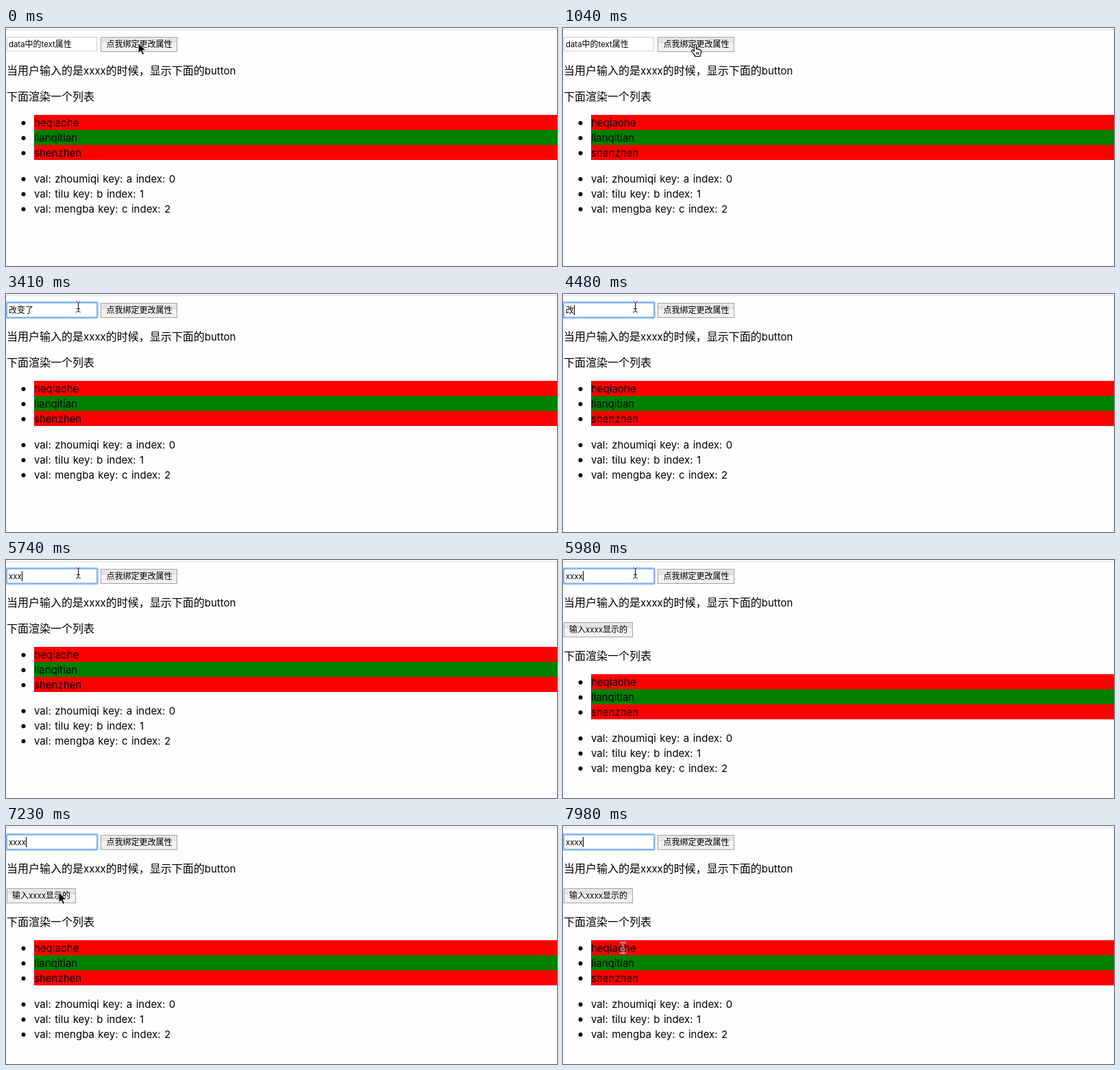
These frames come from a looping animation (804x348 px, 8000 ms). An HTML page:

```html
<!DOCTYPE html>
<html lang="zh-CN">
<head>
<meta charset="utf-8">
<title>Data binding demo</title>
<style>
  html, body { margin: 0; width: 100%; height: 100%; overflow: hidden; background: #fefefe; }
  svg { display: block; width: 804px; height: 348px; }
  text { font: 16px Inter, "Noto Sans CJK SC", "Noto Sans CJK", sans-serif; fill: #000; white-space: pre; }
  .latin { font-size: 15px; word-spacing: 1.25px; }
  .small { font-size: 12px; }
  .small .latin { font-size: 11.4px; word-spacing: 0; }
  .button rect { fill: url(#face); stroke: #a3a3a3; }
  .button.pressed rect { fill: url(#facePressed); stroke: #8a8a8a; }
  .crisp { shape-rendering: crispEdges; }
</style>
</head>
<body>
<svg viewBox="0 0 804 348">
  <defs>
    <linearGradient id="face" x2="0" y2="1">
      <stop offset="0" stop-color="#e9e9e9"/>
      <stop offset=".4" stop-color="#dedede"/>
      <stop offset=".42" stop-color="#f4f4f4"/>
      <stop offset="1" stop-color="#f0f0f0"/>
    </linearGradient>
    <linearGradient id="facePressed" x2="0" y2="1">
      <stop offset="0" stop-color="#bdbdbd"/>
      <stop offset="1" stop-color="#d6d6d6"/>
    </linearGradient>
  </defs>

  <path class="crisp" d="M0 2.5H804" stroke="#d9d9d9"/>

  <rect x="1.5" y="13.5" width="131" height="20" fill="#fff" stroke="#cfcfcf"/>
  <g id="focus" fill="none">
    <rect x="0.5" y="12" width="133" height="23" rx="2" stroke="#b5d6f9" stroke-width="3"/>
    <rect x="1" y="12.5" width="132" height="22" rx="1.5" stroke="#6fafef" stroke-width="1.6"/>
  </g>
  <text id="field" class="small" x="4" y="28"></text>
  <path id="caret" class="crisp" d="M.5 16V31" stroke="#000"/>

  <g id="change" class="button">
    <rect x="138.5" y="13.5" width="111" height="21"/>
    <text class="small" x="146.5" y="28">点我绑定更改属性</text>
  </g>

  <text x="1" y="68">当用户输入的是<tspan class="latin">xxxx</tspan>的时候，显示下面的<tspan class="latin">button</tspan></text>

  <g id="extra" class="button">
    <rect x="1.5" y="91.5" width="100" height="21"/>
    <text class="small" x="9" y="106">输入<tspan class="latin">xxxx</tspan>显示的</text>
  </g>

  <g id="lists">
    <text x="1" y="106">下面渲染一个列表</text>
  </g>

  <g id="cursor" stroke-linejoin="round" stroke-linecap="round">
    <path data-kind="arrow" d="M0 0V15L3.6 11.7L6 17.3L8.6 16.2L6.2 10.8H11Z" fill="#000" stroke="#fff"/>
    <path data-kind="hand" fill="#fff" stroke="#000" stroke-width="1.2"
      d="M-1.5 10V1.5Q-1.5 0 0 0T1.5 1.5V7Q3 5.6 4.2 7.4Q5.8 6.4 6.8 8.2Q8.6 7.6 8.6 9.5V12Q8.4 14 7.2 15.5V17.5H-.5V16Q-2.5 14 -4.6 11Q-6 8.8 -4.6 8.2Q-3.2 7.8 -1.5 10ZM2.2 11.5V14.5M4.5 11.5V14.5"/>
    <g data-kind="beam" fill="none">
      <path id="beam" d="M-3 -7.5Q0 -7.5 0 -5.5V5.5Q0 7.5 -3 7.5M3 -7.5Q0 -7.5 0 -5.5M3 7.5Q0 7.5 0 5.5M-2 2.5H2"
        stroke="#fff" stroke-opacity=".6" stroke-width="2.4"/>
      <use href="#beam"/>
      <path d="M-3 -7.5Q0 -7.5 0 -5.5V5.5Q0 7.5 -3 7.5M3 -7.5Q0 -7.5 0 -5.5M3 7.5Q0 7.5 0 5.5M-2 2.5H2" stroke="#111"/>
    </g>
  </g>
</svg>

<script>
const LOOP = 8000;
const TICK = 57.5;
const $ = id => document.getElementById(id);

const rows = [
  [127, 'heqiaohe', '#f00'],
  [149, 'lianqitian', '#008000'],
  [171, 'shenzhen', '#f00'],
  [209, 'val: zhoumiqi key: a index: 0'],
  [231, 'val: tilu key: b index: 1'],
  [253, 'val: mengba key: c index: 2']
];
$('lists').innerHTML += rows.map(([y, label, color = 'none']) => `
  <rect x="41" y="${y}" width="763" height="22" fill="${color}"/>
  <circle cx="25.5" cy="${y + 12}" r="3"/>
  <text class="latin" x="41" y="${y + 17}">${label}</text>`).join('');

const typed = [
  [0, 'data中的text属性'], [1940, '改变了'], [4190, '改变'], [4420, '改'], [4780, ''],
  [5260, 'x'], [5500, 'xx'], [5740, 'xxx'], [5980, 'xxxx']
];

const caretShown = [[3050, 3410], [3950, 6480], [6980, 7480], [7980, LOOP]];

// time, x, y, shape held until the next entry
const moves = [
  [0, 193, 22, 'arrow'], [899, 193, 22, 'arrow'],
  [900, 192, 23, 'arrow'], [1039, 192, 23, 'arrow'],
  [1040, 193, 24, 'hand'], [2410, 194, 24, 'hand'],
  [2640, 140, 21, 'arrow'], [2700, 128, 20, 'beam'],
  [2870, 105, 19, 'beam'], [6269, 105, 19, 'beam'],
  [6270, 106, 30, 'beam'], [6330, 108, 46, 'arrow'],
  [6390, 110, 62, 'beam'], [6450, 111, 78, 'arrow'],
  [6700, 111, 78, 'arrow'], [7230, 77, 97, 'arrow'],
  [7430, 81, 124, 'beam'], [7520, 83, 137, 'beam'],
  [7750, 94, 176, 'beam'], [7900, 94, 176, 'beam'],
  [7980, 87, 178, 'beam'], [LOOP, 87, 178, 'beam']
];

const between = (t, from, to) => t >= from && t < to;
const show = (el, on) => el.setAttribute('visibility', on ? 'visible' : 'hidden');
const latest = (list, t) => list.findLastIndex(([at]) => at <= t);

function drawField(t) {
  const text = typed[latest(typed, t)][1];
  const field = $('field');
  if (field.textContent !== text) {
    field.innerHTML = text.replace(/[a-z]+/g, '<tspan class="latin">$&</tspan>');
  }
  show($('focus'), t >= 3050);
  show($('caret'), caretShown.some(([from, to]) => between(t, from, to)));
  const caretX = 4 + Math.round(text ? field.getComputedTextLength() : 0);
  $('caret').setAttribute('transform', `translate(${caretX})`);
}

function drawCursor(t) {
  const i = latest(moves, t);
  const [from, x, y, kind] = moves[i];
  const [to, nextX, nextY] = moves[i + 1];
  const k = Math.floor((t - from) / TICK) * TICK / (to - from);
  const px = Math.round(x + (nextX - x) * k);
  const py = Math.round(y + (nextY - y) * k);
  const shift = kind === 'beam' ? 0.5 : 0;
  $('cursor').setAttribute('transform', `translate(${px + shift} ${py})`);
  for (const shape of $('cursor').children) show(shape, shape.dataset.kind === kind);
}

function draw() {
  const t = performance.now() % LOOP;
  const expanded = t >= 5980;
  drawField(t);
  drawCursor(t);
  $('change').classList.toggle('pressed', between(t, 1760, 1940));
  show($('extra'), expanded);
  $('lists').setAttribute('transform', `translate(0 ${expanded ? 40 : 0})`);
  requestAnimationFrame(draw);
}
draw();
</script>
</body>
</html>
```
